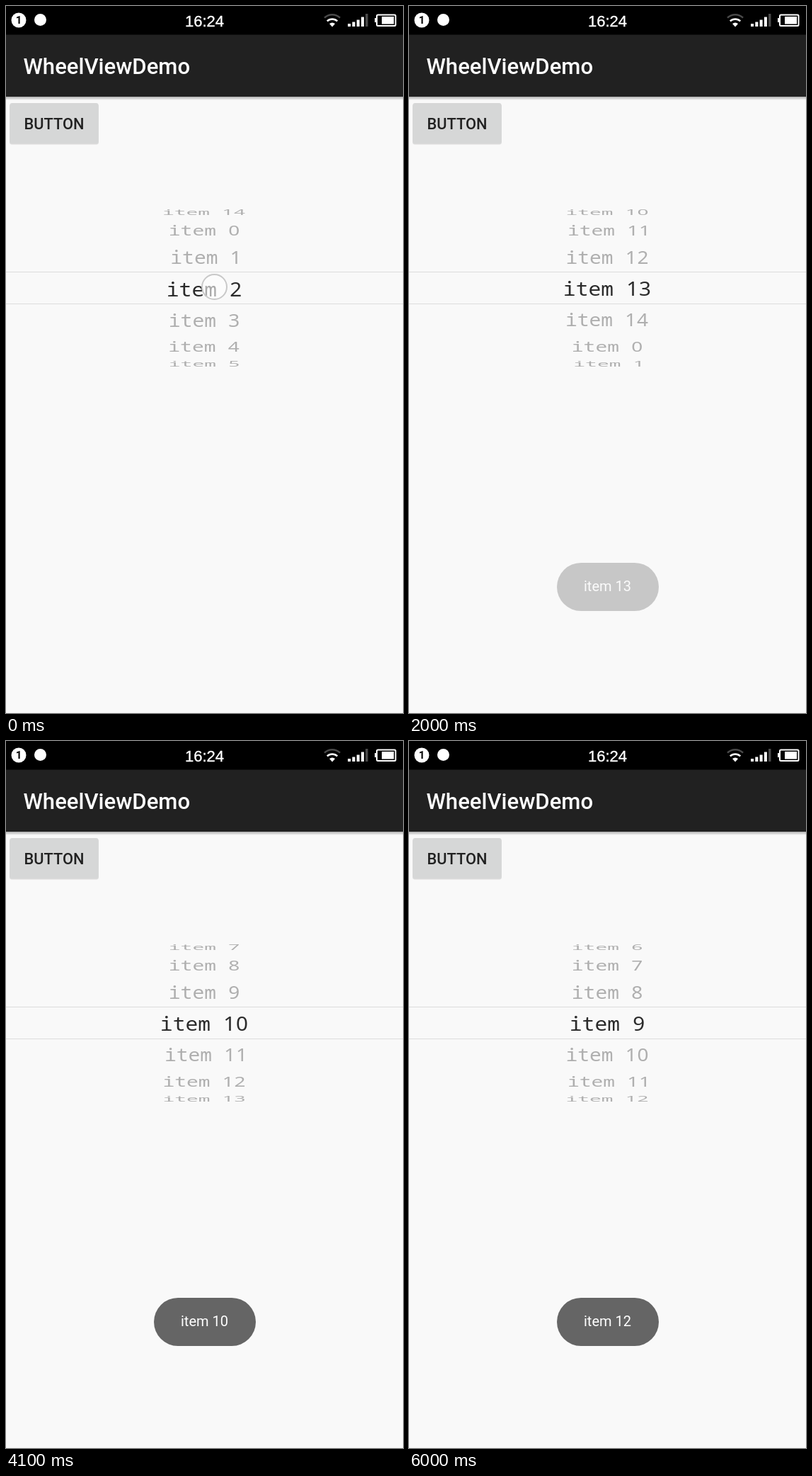
Animation of 561x998 px, one loop 6100 ms. Source, as an HTML page with a canvas:

```html
<!DOCTYPE html>
<html lang="en">
<head>
<meta charset="utf-8">
<title>Wheel picker</title>
<style>
  html, body { margin: 0; width: 100%; height: 100%; overflow: hidden; background: #f9f9f9; }
  svg, canvas { position: absolute; left: 0; top: 0; }
  .ui { font-family: Roboto, sans-serif; font-weight: 500; }
  .clock { font: 22px "Liberation Sans", Arial, sans-serif; stroke: #fff; stroke-width: .4; }
  #touch {
    position: absolute; left: -18.5px; top: -18.5px; width: 37px; height: 37px;
    box-sizing: border-box; border: 2.5px solid #c9c9c9; border-radius: 50%;
    background: rgba(255, 255, 255, .6);
  }
  #toast {
    position: absolute; left: 208.5px; top: 786px; width: 144px; height: 68px;
    border-radius: 34px; background: #656565; color: #fff;
    font: 20px/67px Roboto, sans-serif; text-align: center;
  }
</style>
</head>
<body>
<svg width="561" height="998" viewBox="0 0 561 998">
  <defs>
    <linearGradient id="shade" x2="0" y2="1">
      <stop stop-color="#000" stop-opacity=".3"/>
      <stop offset="1" stop-color="#000" stop-opacity="0"/>
    </linearGradient>
  </defs>
  <rect width="561" height="128" fill="#212121"/>
  <rect width="561" height="40.5"/>
  <rect y="128" width="561" height="5" fill="url(#shade)"/>

  <g fill="#fff">
    <circle cx="18" cy="20" r="10.5"/>
    <circle cx="48.5" cy="19.5" r="8.5"/>
    <text class="clock" x="280.5" y="28.5" text-anchor="middle">16:24</text>
    <path d="M483 25h4v4h-4zM489.3 22.5h4v6.5h-4zM495.6 19.5h4v9.500h-4zM501.900 15.500h4v13.500h-4z"/>
    <path d="M508 11h3.500v18h-3.500z" fill="#4a4a4a"/>
    <path d="M461 29.500l-4-4.500a6 6 0 0 1 8 0z"/>
    <path d="M521 17h3v6h-3z"/>
    <rect id="charge" x="531" y="15" width="17" height="10.500"/>
  </g>
  <text class="ui" x="18" y="25.300" font-size="15" text-anchor="middle" style="font-weight:700">1</text>
  <g fill="none" stroke="#fff" stroke-width="2.500">
    <path d="M453.800 21.300a10.500 10.500 0 0 1 14.400 0"/>
    <path d="M450 16.700a16 16 0 0 1 22 0" stroke="#4a4a4a"/>
    <rect x="524" y="12.500" width="26.500" height="15.500" rx="1.500" stroke-width="2"/>
  </g>

  <text class="ui" x="24.500" y="96" font-size="31.100" fill="#fff">WheelViewDemo</text>
  <rect x="5" y="138" width="126" height="57.500" rx="3.500" fill="#000" opacity=".12"/>
  <rect x="5.500" y="137" width="125" height="57" rx="3" fill="#d6d7d7"/>
  <text class="ui" x="68" y="174" font-size="21.800" text-anchor="middle" fill="#212121">BUTTON</text>
  <path d="M0 375.500h561M0 420.500h561" stroke="#dcdcdc"/>
</svg>
<canvas id="wheel" width="561" height="998"></canvas>
<div id="touch"></div>
<div id="toast"></div>

<script>
const LOOP = 6100, STEP = 100, COUNT = 15;
const MID_X = 280.5, MID_Y = 397.8, PITCH = 45.5;
const ANGLE = Math.PI / 8, RADIUS = PITCH / ANGLE;
const BAND = { top: 375.5, bottom: 420.5 };
const SIZE = 28, CELL = SIZE * 0.6, BASELINE = 11;
const LETTERS = `${SIZE}px "Noto Sans Mono", monospace`;
const DIGITS = `${SIZE}px "Noto Sans", sans-serif`;

const byId = id => document.getElementById(id);
const ctx = byId('wheel').getContext('2d');
const touch = byId('touch'), toast = byId('toast'), charge = byId('charge');

const linear = u => u;
const speedUp = u => u * u;
const slowDown = u => 1 - (1 - u) ** 2;
const smooth = u => u * u * (3 - 2 * u);

// Wheel position in items: [time, position, easing towards it]
const path = [
  [0, 1.98], [650, -5.93, speedUp], [1650, -16.89, slowDown], [1800, -17, slowDown],
  [2050, -17, linear], [2300, -15.3, smooth], [2500, -14.9, slowDown], [2650, -15, slowDown],
  [2700, -15, linear], [3250, -5.6, smooth], [3500, -5, slowDown],
  [4150, -5, linear], [4400, -3.3, smooth], [4700, -3, slowDown],
  [5250, -3, linear], [5350, -4.64, speedUp], [5800, -6, slowDown]
];

// The finger moves with the wheel while it is down.
const drags = [
  { down: 0, up: 650, y: 396, x0: 294, x1: 289 },
  { down: 2050, up: 2300, y: 470, x0: 288, x1: 290 },
  { down: 2700, up: 3250, y: 797, x0: 284, x1: 292 },
  { down: 4150, up: 4400, y: 440, x0: 286, x1: 290 },
  { down: 5000, up: 5350, y: 211, x0: 281, x1: 286 }
];
const FADE = 150;

function positionAt(t) {
  const i = path.findIndex(([time]) => time > t);
  if (i < 0) return path[path.length - 1][1];
  const [t0, a] = path[i - 1], [t1, b, ease] = path[i];
  return a + (b - a) * ease((t - t0) / (t1 - t0));
}

const isDigit = c => c >= '0' && c <= '9';

function measure(c) {
  ctx.font = isDigit(c) ? DIGITS : LETTERS;
  return ctx.measureText(c);
}

const inset = c => (CELL - measure(c).width) / 2;

function fillLabel(label) {
  const last = label.length - 1, end = label[last];
  const left = inset('i') - measure('i').actualBoundingBoxLeft;
  const right = last * CELL + inset(end) + measure(end).actualBoundingBoxRight;
  const start = -(left + right) / 2;
  [...label].forEach((c, i) => ctx.fillText(c, start + i * CELL + inset(c), BASELINE));
}

function drawSlice(label, y, squash, top, bottom, color, widen) {
  ctx.save();
  ctx.beginPath();
  ctx.rect(0, top, 561, bottom - top);
  ctx.clip();
  ctx.translate(MID_X, y);
  ctx.scale(widen, squash);
  ctx.fillStyle = color;
  fillLabel(label);
  ctx.restore();
}

function drawWheel(position) {
  ctx.clearRect(0, 0, 561, 998);
  const nearest = Math.round(position);
  for (let i = nearest - 4; i <= nearest + 4; i++) {
    const angle = (i - position) * ANGLE, squash = Math.cos(angle);
    if (squash <= 0.01) continue;
    const label = 'item ' + ((i % COUNT) + COUNT) % COUNT;
    const y = MID_Y + RADIUS * Math.sin(angle);
    drawSlice(label, y, squash, 0, BAND.top, '#afafaf', 1);
    drawSlice(label, y, squash, BAND.bottom, 998, '#afafaf', 1);
    drawSlice(label, y, squash, BAND.top, BAND.bottom, '#2b2b2b', 1.06);
  }
}

function drawTouch(t) {
  const drag = drags.find(d => t >= d.down && t < d.up + FADE);
  touch.style.opacity = drag ? Math.min(1, 1 - (t - drag.up) / FADE) : 0;
  if (!drag) return;
  const held = Math.min(t, drag.up);
  const x = drag.x0 + (drag.x1 - drag.x0) * (held - drag.down) / (drag.up - drag.down);
  const y = drag.y + (positionAt(drag.down) - positionAt(held)) * PITCH;
  touch.style.transform = `translate(${x}px, ${y}px)`;
}

function drawToast(t) {
  toast.style.opacity = Math.max(0, Math.min(1, (t - 1900) / 300));
  toast.textContent = 'item ' + (t < 3700 ? 13 : t < 4900 ? 10 : 12);
}

function drawCharge(t) {
  const full = (t + 1000) % 1200 < 300;
  charge.setAttribute('x', full ? 526 : 531);
  charge.setAttribute('width', full ? 22.5 : 17);
}

const began = performance.now();
function frame() {
  const t = Math.floor((performance.now() - began) % LOOP / STEP) * STEP;
  drawWheel(positionAt(t));
  drawTouch(t);
  drawToast(t);
  drawCharge(t);
  requestAnimationFrame(frame);
}
frame();
</script>
</body>
</html>
```
